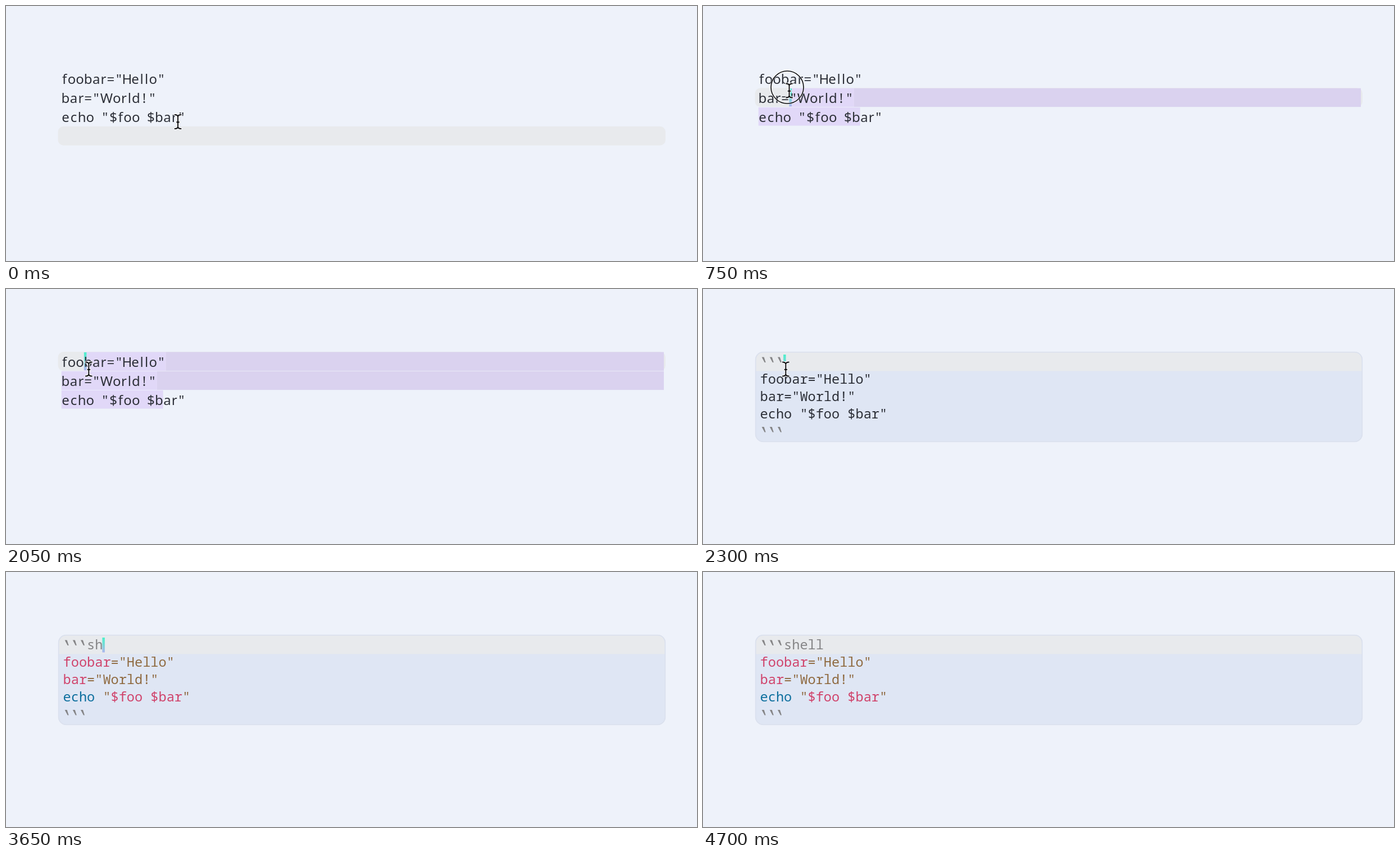
An HTML page with a canvas for the animation above (4.95 s loop, 1230 by 455 pixels).

```html
<!DOCTYPE html>
<html lang="en">
<head>
<meta charset="utf-8">
<title>Code block</title>
<style>
  html, body { margin: 0; width: 100%; height: 100%; overflow: hidden; background: #eef2fa; }
  canvas { display: block; width: 1230px; height: 455px; }
</style>
</head>
<body>
<canvas id="stage" width="1230" height="455"></canvas>
<script>
const ctx = document.getElementById('stage').getContext('2d');
const LOOP = 4950, STEP = 50;
const PROSE = '24px "Noto Sans", "Open Sans", sans-serif';
const CODE = '23.6px "Noto Sans Mono", "DejaVu Sans Mono", monospace';
const BG = '#eef2fa', HOVER = '#e8eaed', INK = '#2c2f37', GREY = '#858587';
const RED = '#d0436b', BROWN = '#8f6a40', BLUE = '#0d6f9e';
const LEFT = 98.7, CELL = 14.6, ROW = 34.2, CODE_LEFT = 101.6, CODE_CELL = 14.16;

const lines = ['foobar="Hello"', 'bar="World!"', 'echo "$foo $bar"'];
const anchor = 13; // selection end within the last line

const tokens = [
  [['foobar', RED], ['="Hello"', BROWN]],
  [['bar', RED], ['="World!"', BROWN]],
  [['echo', BLUE], [' "', BROWN], ['$foo $bar', RED], ['"', BROWN]]
];

// [time, x, y] of the pointer
const pointerPath = [
  [0, 306, 206.5], [50, 296, 205.5], [100, 286, 204.5], [350, 286, 204.5],
  [450, 277, 204], [500, 265, 200], [550, 242, 193], [600, 215.3, 185],
  [650, 190, 175], [700, 168, 161], [750, 153.5, 151], [800, 150.5, 146],
  [850, 149, 144.5], [1000, 147.3, 143], [2600, 147.3, 143],
  [2750, 216, 160], [2950, 317, 185]
];

// [time, line, column] of the caret while dragging
const drag = [
  [300, 2, 13], [500, 2, 12], [550, 2, 11], [600, 2, 10], [650, 2, 7],
  [700, 1, 5], [750, 1, 4], [800, 0, 4], [850, 0, 3]
];

const keys = [3450, 3600, 3750, 3850, 4000];

const rowTop = i => 112.5 + i * ROW;

function advance(ch) {
  if (ch === 'l') return 8.5;
  if (ch === 'f' || ch === 'r') return CELL * 0.75;
  if (ch === 'W') return CELL * 1.5;
  return ch === ' ' ? 12 : CELL;
}

function column(line, n) {
  let x = LEFT;
  for (const ch of lines[line].slice(0, n)) x += advance(ch);
  return x;
}

function rect(x, y, w, h, color) {
  ctx.fillStyle = color;
  ctx.fillRect(x, y, w, h);
}

function rounded(x, y, w, h, r) {
  ctx.beginPath();
  ctx.roundRect(x, y, w, h, r);
}

function drawCaret(x, y, h, visible = h) {
  const g = ctx.createLinearGradient(0, y, 0, y + h);
  g.addColorStop(0, '#4df0cb');
  g.addColorStop(0.45, '#72dcd6');
  g.addColorStop(1, '#aeb5ef');
  rect(x, y, 4.5, visible, g);
}

function pointerAt(t) {
  let i = 0;
  while (i < pointerPath.length - 1 && pointerPath[i + 1][0] <= t) i++;
  const a = pointerPath[i], b = pointerPath[i + 1] || a;
  const k = a === b ? 0 : (t - a[0]) / (b[0] - a[0]);
  return [a[1] + (b[1] - a[1]) * k, a[2] + (b[2] - a[2]) * k];
}

function drawSelection([, line, col]) {
  for (let i = line; i < 3; i++) {
    const last = i === 2;
    const from = i === line ? column(i, col) : LEFT;
    const end = last ? column(i, anchor) : column(i, lines[i].length) + 1;
    const y = rowTop(i), h = last ? 32.6 : 33.4;
    if (!last) rect(end, y, 1171 - end, h, '#dad2ef');
    rect(from, y, end - from, h, '#e1d8f8');
  }
}

function drawProse(t) {
  const state = drag.filter(s => s[0] <= t).pop();
  ctx.fillStyle = HOVER;
  rounded(92.5, rowTop(state ? state[1] : 3) - 0.4, 1081.5, 34, 10);
  ctx.fill();
  if (state) {
    drawSelection(state);
    if (t < 1400 || t >= 1900)
      drawCaret(column(state[1], state[2]), rowTop(state[1]) + 0.5, 32);
  }
  ctx.font = PROSE;
  ctx.textAlign = 'center';
  ctx.fillStyle = INK;
  lines.forEach((text, i) => {
    let x = LEFT;
    for (const ch of text) {
      const w = advance(ch);
      ctx.fillText(ch, x + w / 2, 138.8 + i * 34.3);
      x += w;
    }
  });
}

function drawFence(y) {
  ctx.fillStyle = GREY;
  for (let i = 0; i < 3; i++) {
    const x = CODE_LEFT + i * CODE_CELL;
    ctx.beginPath();
    ctx.moveTo(x + 3, y);
    ctx.lineTo(x + 7, y);
    ctx.lineTo(x + 10, y + 9.5);
    ctx.lineTo(x + 8, y + 9.5);
    ctx.fill();
  }
}

function codeText(text, n, y, color) {
  ctx.fillStyle = color;
  ctx.fillText(text, CODE_LEFT + n * CODE_CELL, y);
}

function drawBlock(t) {
  ctx.save();
  rounded(93, 112, 1081, 161, 14);
  ctx.clip();
  rect(93, 112, 1081, 161, '#dfe6f4');
  rect(93, 112, 1081, 34.5, HOVER);
  ctx.restore();
  rounded(93.7, 112.7, 1079.6, 159.6, 13.5);
  ctx.strokeStyle = '#dbe1ee';
  ctx.lineWidth = 1.8;
  ctx.stroke();

  const typed = keys.filter(k => k <= t).length;
  const colored = (t >= 3600 && t < 3750) || t >= 4050;
  ctx.font = CODE;
  ctx.textAlign = 'left';
  drawFence(121.5);
  codeText('shell'.slice(0, typed), 3, 138, GREY);
  tokens.forEach((row, i) => {
    let n = 0;
    for (const [text, color] of row) {
      codeText(text, n, 169 + i * 31.2, colored ? color : INK);
      n += text.length;
    }
  });
  drawFence(246);

  if (t < 2850 || (t >= 3450 && t < 4650))
    drawCaret(CODE_LEFT + (3 + typed) * CODE_CELL - 1, 117, 26.5, t < 2350 ? 12 : 26.5);
}

function outline(color, width) {
  ctx.strokeStyle = color;
  ctx.lineWidth = width;
  ctx.stroke();
}

function drawPointer(t) {
  const [x, y] = pointerAt(t);
  if (t >= 300 && t < 1200) {
    ctx.globalAlpha = t < 1150 ? 1 : 0.5;
    ctx.beginPath();
    ctx.arc(x - 3.5, y - 6, 29, 0, Math.PI * 2);
    outline('rgba(255,255,255,.55)', 3.5);
    outline('#08080a', 1.6);
    ctx.globalAlpha = 1;
  }
  ctx.save();
  ctx.translate(x, y);
  ctx.lineCap = 'round';
  ctx.lineJoin = 'round';
  ctx.beginPath();
  for (const s of [-1, 1]) {
    ctx.moveTo(-5.5, s * 12.5);
    ctx.quadraticCurveTo(-0.5, s * 12.5, 0, s * 9);
    ctx.quadraticCurveTo(0.5, s * 12.5, 5.5, s * 12.5);
  }
  ctx.moveTo(0, -9.5);
  ctx.lineTo(0, 9.5);
  ctx.moveTo(-2, 0.8);
  ctx.lineTo(2, 0.8);
  outline('#fbfbfe', 4.2);
  outline('#0b0b0d', 1.9);
  ctx.restore();
}

function frame(now) {
  const t = Math.floor((now % LOOP) / STEP) * STEP;
  rect(0, 0, 1230, 455, BG);
  if (t < 2300) drawProse(t);
  else drawBlock(t);
  if (t < 3450) drawPointer(t);
}

const start = performance.now();
function tick() {
  frame(performance.now() - start);
  requestAnimationFrame(tick);
}
tick();
</script>
</body>
</html>
```
